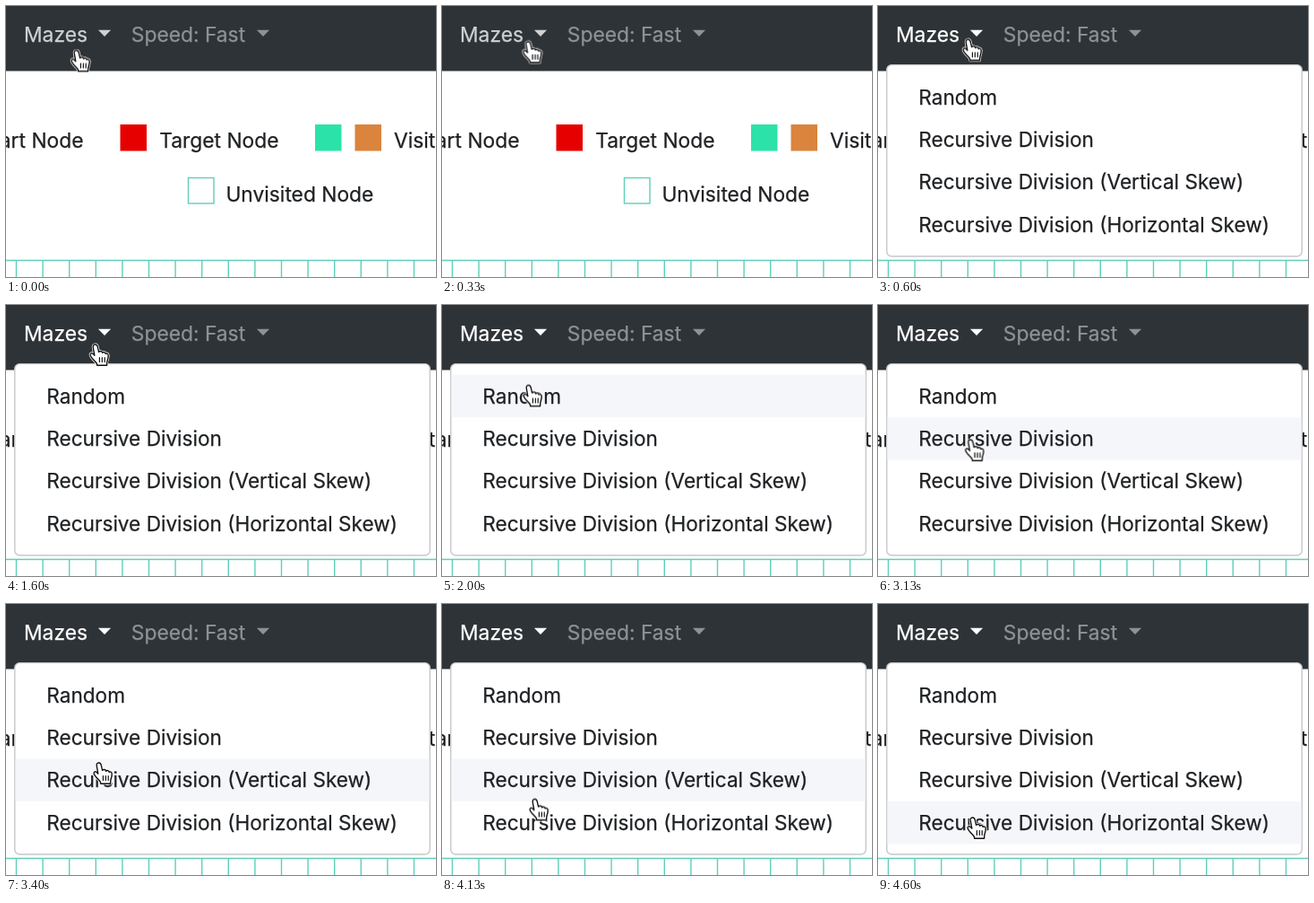
These frames come from a looping animation (480 px wide and 302 px high, 4940 ms). An HTML page:

```html
<!DOCTYPE html>
<html lang="en">
<head>
<meta charset="utf-8">
<title>Maze menu</title>
<style>
  html, body { margin: 0; width: 100%; height: 100%; overflow: hidden; background: #fff; }
  svg { display: block; width: 100vw; height: 100vh; color: #1e2023; }
  text {
    font: 22.8px Inter, "Open Sans", sans-serif;
    fill: currentColor; stroke: currentColor; stroke-width: .25;
  }

  .bar { fill: #2e3337; }
  .speed, .mazes { fill: currentColor; }
  .speed { color: #8f9294; }
  .grid { stroke: #5fcfba; stroke-width: 1.4; fill: none; }
  .panel { fill: #fff; stroke: #c6c8ca; stroke-width: 1.4; }
  .menu text { font-size: 22.6px; }

  .mazes, .menu, .hover, .hand { animation: 4.94s infinite step-end; }
  .mazes { animation-name: brighten; }
  .menu { animation-name: open; }
  .hover { fill: #f5f6fa; animation-name: hover; }
  .hand { animation-name: point; }

  @keyframes brighten {
    0% { color: #cfd1d2; }
    12.14%, 100% { color: #fff; }
  }
  @keyframes open {
    0% { visibility: hidden; }
    12.14%, 100% { visibility: visible; }
  }
  @keyframes hover {
    0% { opacity: 0; transform: translateY(0); }
    39.13% { opacity: 1; transform: translateY(0); }
    51.19% { opacity: 1; transform: translateY(47.4px); }
    68.75% { opacity: 1; transform: translateY(94.8px); }
    86.3%, 100% { opacity: 1; transform: translateY(142.2px); }
  }
  /* the pointer moves at 15 steps a second, with rests between */
  @keyframes point {
    0% { transform: translate(79px, 49.5px); }
    1.35% { transform: translate(79px, 49.5px); animation-timing-function: steps(5, start); }
    8.09% { transform: translate(101px, 37.3px); }
    32.38% { transform: translate(101px, 37.3px); animation-timing-function: steps(1, start); }
    33.73% { transform: translate(100px, 44px); animation-timing-function: steps(6, start); }
    41.83% { transform: translate(97px, 89.5px); }
    48.48% { transform: translate(97px, 89.5px); animation-timing-function: steps(3, start); }
    52.53% { transform: translate(103.3px, 130px); animation-timing-function: steps(4, start); }
    57.93% { transform: translate(103.5px, 143.5px); }
    63.3% { transform: translate(103.5px, 143.5px); animation-timing-function: steps(5, start); }
    70.1% { transform: translate(104px, 177px); }
    79.5% { transform: translate(104px, 177px); animation-timing-function: steps(4, start); }
    84.89% { transform: translate(104px, 217.5px); animation-timing-function: steps(4, start); }
    90.29% { transform: translate(105px, 222px); }
    90.4% { transform: translate(105px, 222px); animation-timing-function: steps(3, start); }
    94.4%, 100% { transform: translate(106px, 238px); }
  }
</style>
</head>
<body>
<svg viewBox="0 0 480 302">
  <defs>
    <path id="caret" d="M-7.1 0H7.1L0 7.1Z"/>
    <path id="shape" d="M-2.8 3.2C-3.4-.6 1.4-1.2 2.2 2.4L3.6 8.4C4.6 6.9 7.4 7.4 7.6 9.2
      C8.8 7.9 10.9 8.6 11.2 10.3C12.6 9.4 14.2 10.4 14.2 12.4C14.3 15.5 13.2 17.5 12.8 19.3
      L12.6 23.2H1.8L1.2 21C-.6 18.8-2.6 17-4.4 14.6C-5.6 13-6.8 11-5.2 10
      C-3.8 9.2-2.4 10.6-1.2 12.2Z"/>
  </defs>

  <rect class="bar" width="480" height="72.5"/>
  <g class="mazes">
    <text x="20" y="39.8">Mazes</text>
    <use href="#caret" x="110" y="26.8"/>
  </g>
  <g class="speed">
    <text x="139.8" y="39.8">Speed: Fast</text>
    <use href="#caret" x="287" y="26.8"/>
  </g>

  <g class="legend">
    <text x="86.5" y="158.3" text-anchor="end">Start Node</text>
    <rect x="127.5" y="132" width="29.5" height="29.5" fill="#e60000"/>
    <text x="171.2" y="158.3">Target Node</text>
    <rect x="345" y="132" width="29.5" height="29.5" fill="#2be3a9"/>
    <rect x="389.5" y="132" width="29.5" height="29.5" fill="#da843e"/>
    <text x="433" y="158.3">Visited Node</text>
    <rect class="grid" x="203.5" y="191.5" width="28.5" height="28.5"/>
    <text x="245.4" y="217.6">Unvisited Node</text>
  </g>

  <path class="grid" d="M0 283.5H480"/>
  <path d="M10.8 293H480" stroke="#5fcfba" stroke-width="18" stroke-dasharray="1.4 28.2"/>

  <g class="menu">
    <rect class="panel" x="9.8" y="65.6" width="463.4" height="213.4" rx="5.5"/>
    <rect class="hover" x="10.6" y="77.8" width="461.8" height="47.4"/>
    <text x="45.3" y="109.5">Random</text>
    <text x="45.3" y="156.9">Recursive Division</text>
    <text x="45.3" y="204.3">Recursive Division (Vertical Skew)</text>
    <text x="45.3" y="251.7">Recursive Division (Horizontal Skew)</text>
  </g>

  <g class="hand" stroke-linejoin="round" stroke-linecap="round">
    <use href="#shape" fill="#fff" stroke="#fff" stroke-width="2.8"/>
    <use href="#shape" fill="#fff" stroke="#111" stroke-width="1.4"/>
    <path d="M4.4 14.6V19.4M7.3 14.6V19.4M10.2 14.6V19.4" stroke="#111" stroke-width="1.2"/>
  </g>
</svg>
</body>
</html>
```
